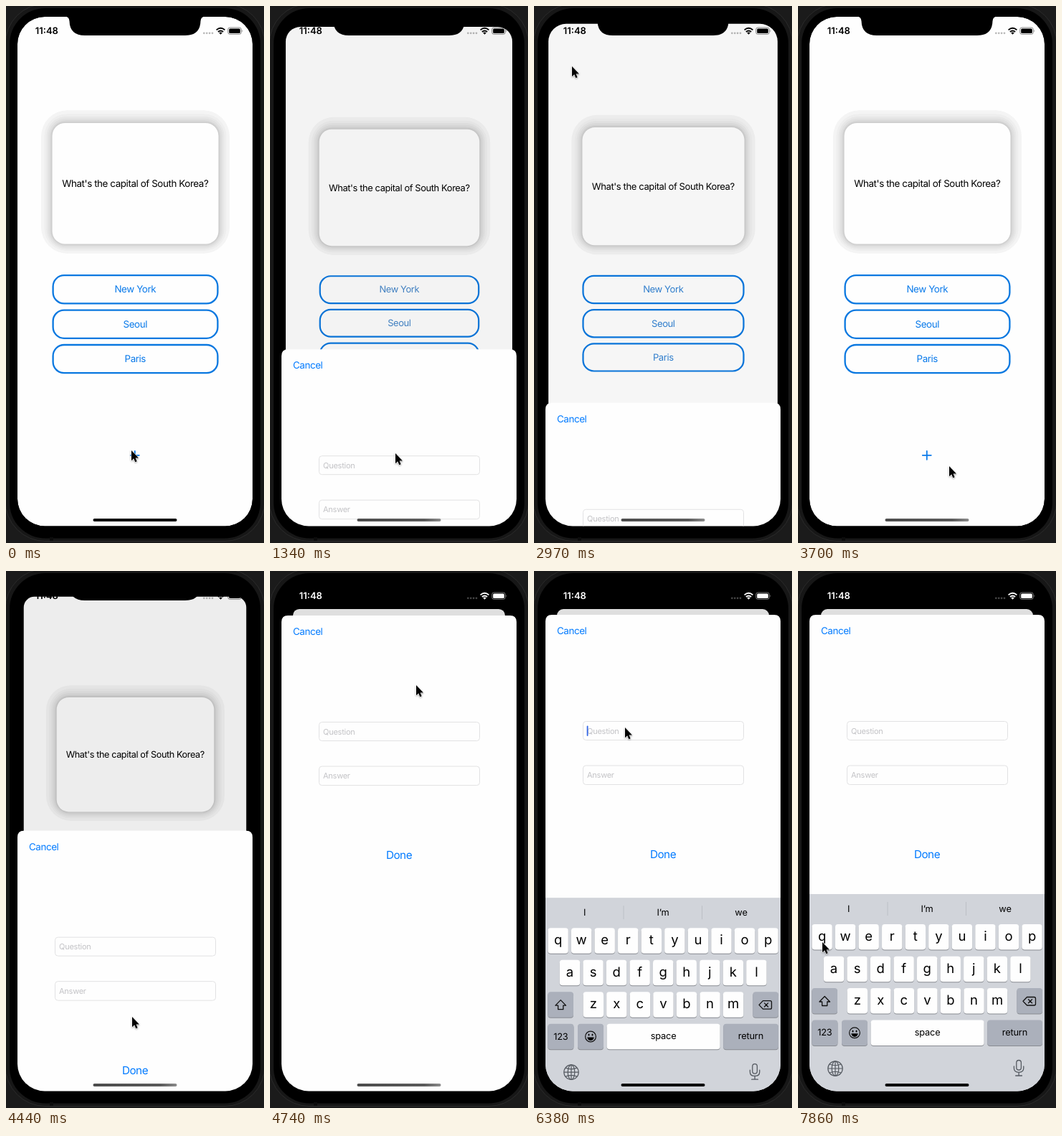
These frames come from a looping animation (360 by 748 pixels, 8000 ms). An HTML page:

```html
<!DOCTYPE html>
<html lang="en">
<head>
<meta charset="utf-8">
<title>Quiz app</title>
<style>
  html, body { margin: 0; width: 100%; height: 100%; overflow: hidden; background: #1b1b1b; }
  svg { display: block; width: 100%; height: 100%; }
  text { font-family: Inter, Roboto, sans-serif; text-rendering: geometricPrecision; }
  .mid { text-anchor: middle; }
  .body { font-size: 13.4px; letter-spacing: -.42px; }
  .hint { font-size: 11px; letter-spacing: -.25px; fill: #c3c3c6; }
  .done { font-size: 15.3px; letter-spacing: -.5px; }
  .key { font-size: 18.5px; }
  .word { font-size: 12.8px; letter-spacing: -.2px; }
  .line { fill: none; stroke-linecap: round; stroke-linejoin: round; }
</style>
</head>
<body>
<svg viewBox="0 0 360 748">
  <defs>
    <clipPath id="screen"><rect x="16" y="15" width="328" height="709.5" rx="38"/></clipPath>
    <linearGradient id="fade">
      <stop offset="0" stop-color="#4c4c4c"/>
      <stop offset=".8" stop-color="#5a5a5a"/>
      <stop offset="1" stop-color="#8c8c8c"/>
    </linearGradient>
    <filter id="soft" x="-50%" y="-50%" width="200%" height="200%">
      <feDropShadow dx="0" dy="1" stdDeviation=".9" flood-opacity=".4"/>
    </filter>
  </defs>

  <rect width="360" height="748" fill="#1b1b1b"/>
  <rect x="-1" y="-3" width="362" height="748.5" rx="56" fill="#171717" stroke="#2b2b2b"/>
  <rect x="5" y="3" width="350" height="738.5" rx="50"/>
  <rect x="61" y="740" width="5" height="5" fill="#0c0c0c"/>

  <g clip-path="url(#screen)">
    <g id="home">
      <rect id="page" x="16" y="15" width="328" height="709.5" fill="#fefefe"/>
      <g id="glow"></g>
      <rect x="64.5" y="163" width="232" height="168.5" rx="18" fill="#fefefe"/>
      <text class="body mid" x="180.3" y="252">What's the capital of South Korea?</text>
      <g id="choices"></g>
      <path id="plus" class="line" d="M173.8 625.8H185.8M179.8 619.8V631.8" stroke-width="1.8"/>
      <rect id="dim" x="16" y="15" width="328" height="709.5"/>
    </g>

    <g id="sheet">
      <path d="M16 720V9Q16 0 25 0H335Q344 0 344 9V720Z" fill="#fefefe"/>
      <text id="cancel" class="body" x="32" y="27" fill="#007aff">Cancel</text>
      <g fill="none" stroke="#e2e2e3">
        <rect x="68.5" y="148.5" width="224" height="26" rx="4"/>
        <rect x="68.5" y="210" width="224" height="26.5" rx="4"/>
      </g>
      <text class="hint" x="74" y="165.6">Question</text>
      <text class="hint" x="74" y="227.3">Answer</text>
      <text class="done mid" x="180" y="339" fill="#007aff">Done</text>
      <rect id="caret" x="73.7" y="154.5" width="1.8" height="14.5" rx=".9" fill="#3567e6"/>
    </g>

    <g id="board"></g>
  </g>

  <path d="M81 14Q88.500 15 88.500 21Q89 41 110 41H250Q271 41 271.500 21Q271.500 15 279 14Z"/>

  <g id="status" fill="currentColor">
    <text x="40.800" y="39" font-size="13" font-weight="600">11:48</text>
    <g id="dots"></g>
    <g class="line" stroke="currentColor" stroke-width="1.9" style="stroke-linecap:butt">
      <path d="M293.600 33.400Q299.500 28.100 305.400 33.400M295.900 36Q299.500 32.900 303.100 36"/>
    </g>
    <path d="M297.200 37.300Q299.500 35.600 301.800 37.300L299.500 39.700Z"/>
    <rect x="309.700" y="30" width="18.600" height="9.400" rx="2.800" fill="none" stroke="currentColor" stroke-opacity=".45"/>
    <rect x="311.200" y="31.500" width="15.600" height="6.400" rx="1.500"/>
    <path d="M329.500 33Q331.200 34.700 329.500 36.400Z" fill-opacity=".5"/>
  </g>

  <rect id="bar" x="121.500" y="714" width="117" height="4" rx="2"/>
  <path id="pointer" d="M0 0V14.200L3.200 11.300L5.300 16.200L7.700 15.200L5.600 10.400H10Z"
        stroke="#fff" stroke-width="1" paint-order="stroke" filter="url(#soft)"/>
</svg>

<script>
const LOOP = 8000, STEP = 148.2, LAST = 53;
const SHEET_IN = [1278, 4367], SHEET_OUT = 2850, KEYS_IN = 6118;
const PRESS_PLUS = [[1035, 1278], [4140, 4367]], PRESS_CANCEL = [2660, 2850];

// Pointer stops: time, x, y
const PATH = [
  [0, 175, 619], [148, 175, 623], [1630, 175, 623], [2520, 53, 84], [3000, 53, 84],
  [3705, 211, 641], [4150, 176, 621], [4446, 176, 621], [4742, 204, 159],
  [5335, 127, 218], [7120, 127, 218], [7565, 62, 573], [7855, 34, 517]
];

const $ = id => document.getElementById(id);
const set = (id, attrs) => {
  for (const k in attrs) $(id).setAttribute(k, attrs[k]);
};
const within = (t, [a, b]) => t >= a && t < b;
const mix = (a, b, p) => a + (b - a) * p;
const rect = (x, y, w, h, r, rest) =>
  `<rect x="${x}" y="${y}" width="${w}" height="${h}" rx="${r}" ${rest}/>`;
const label = (s, x, y, cls) => `<text class="${cls} mid" x="${x}" y="${y}">${s}</text>`;

function buildHome() {
  const bands = [[15.5, 244], [11, 238], [8, 231], [5.5, 224], [3, 214], [1.2, 203]];
  $('glow').innerHTML = bands.map(([o, c]) =>
    rect(64.5 - o, 163 - o * 1.14, 232 + 2 * o, 168.5 + 2 * o, 18 + o * 1.2, `fill="rgb(${c},${c},${c})"`)
  ).join('');
  $('choices').innerHTML = ['New York', 'Seoul', 'Paris'].map((s, i) =>
    rect(65.6, 375.2 + i * 48.4, 229.8, 39.2, 15.5, 'fill="none" stroke="#0a78e0" stroke-width="2.3"') +
    label(s, 180.3, 399.2 + i * 48.4, 'body')
  ).join('');
  $('dots').innerHTML = [0, 1, 2, 3].map(i =>
    `<circle cx="${276.3 + i * 3.9}" cy="37.800" r="1.350" fill-opacity=".28"/>`).join('');
}

function buildBoard() {
  const cap = (x, y, w, dark) =>
    rect(x, y + 1, w, 35.5, 4, 'fill="#888b91"') +
    rect(x, y, w, 35.5, 4, `fill="${dark ? '#abb0bb' : '#fefefe'}"`);
  const row = (letters, x0, y) => [...letters].map((c, i) => {
    const x = x0 + i * 32.55;
    return cap(x, y, 28.4) + label(c, x + 14.2, y + 23.3, 'key');
  }).join('');
  const icon = (d, w = 1.3, c = '#111') =>
    `<path class="line" d="${d}" stroke="${c}" stroke-width="${w}"/>`;
  const grey = '#555a61';

  $('board').innerHTML =
    rect(16, 450, 328, 290, 0, 'fill="#d1d4da"') +
    rect(124.5, 461, 1, 19, 0, 'fill="#bcc0c6"') + rect(234, 461, 1, 19, 0, 'fill="#bcc0c6"') +
    label('I', 70.5, 475.3, 'word') + label('I’m', 180, 475.3, 'word') + label('we', 289, 475.3, 'word') +
    row('qwertyuiop', 19.4, 492) + row('asdfghjkl', 35.8, 536.7) + row('zxcvbnm', 68.6, 581) +
    cap(19.4, 581, 35.6, true) + cap(305.4, 581, 35.6, true) +
    cap(19.4, 625.5, 36, true) + cap(61, 625.5, 36, true) +
    cap(101.6, 625.5, 158, false) + cap(264.2, 625.5, 76.8, true) +
    label('123', 37.4, 647.4, 'word') + label('space', 180.6, 647.2, 'word') + label('return', 302.4, 647.2, 'word') +
    icon('M37.200 592.500L44.500 600H40.800V605.500H33.600V600H29.900Z') +
    icon('M319.500 593.500H329.500Q331.500 593.500 331.500 595.500V603Q331.500 605 329.500 605H319.500L314 599.250Z' +
         'M321.500 596.700L326.600 601.800M326.600 596.700L321.500 601.800') +
    '<circle cx="79" cy="643.300" r="7.400" fill="none" stroke="#111" stroke-width="1.200"/>' +
    '<ellipse cx="76.500" cy="640.900" rx="1" ry="1.500"/><ellipse cx="81.500" cy="640.900" rx="1" ry="1.500"/>' +
    '<path d="M74.200 644.300H83.800Q82.600 648.900 79 648.900Q75.400 648.900 74.200 644.300Z"/>' +
    `<g fill="none" stroke="${grey}" stroke-width="1.200"><circle cx="52" cy="693" r="10.200"/>` +
    '<ellipse cx="52" cy="693" rx="4.800" ry="10.200"/>' +
    '<path d="M52 682.800V703.200M41.800 693H62.200M44.200 687Q52 690.500 59.800 687M44.200 699Q52 695.500 59.800 699"/></g>' +
    rect(304.8, 681.5, 6.6, 13.5, 3.3, `fill="none" stroke="${grey}" stroke-width="1.300"`) +
    icon('M301.400 690V692.500Q301.400 698.300 308.100 698.300Q314.800 698.300 314.800 692.500V690M308.100 698.300V703M303.700 703H312.500', 1.3, grey);
}

// Critically damped spring from 0 to 1
function spring(ms) {
  if (ms <= 0) return 0;
  const x = ms * 0.0232;
  return 1 - (1 + x) * Math.exp(-x);
}

function sheetAt(t) {
  if (t >= SHEET_IN[1]) return spring(t - SHEET_IN[1]);
  if (t >= SHEET_OUT) {
    const p = 1 - spring(t - SHEET_OUT);
    return p < 0.004 ? 0 : p;
  }
  return spring(t - SHEET_IN[0]);
}

function pointerAt(t) {
  const i = PATH.findIndex(s => s[0] > t);
  if (i < 0) return PATH[PATH.length - 1].slice(1);
  const [t0, x0, y0] = PATH[i - 1], [t1, x1, y1] = PATH[i];
  const u = (t - t0) / (t1 - t0), e = u * u * (3 - 2 * u);
  return [mix(x0, x1, e), mix(y0, y1, e)];
}

function draw(t) {
  const p = sheetAt(t), s = 1 - 0.0976 * p;
  const r = 10 + 28 * (1 - p) ** 2;
  set('home', { transform: `translate(${180 * (1 - s)} ${15 + 38 * p - 15 * s}) scale(${s})` });
  set('page', { rx: r });
  set('dim', { rx: r, opacity: 0.12 * p });

  const g = Math.min(1, p * 1.1);
  const tint = `rgb(${mix(10, 150, g)},${mix(122, 150, g)},${mix(234, 154, g)})`;
  set('choices', { fill: tint });
  set('plus', { stroke: tint, opacity: PRESS_PLUS.some(w => within(t, w)) ? 0.25 : 1 });

  set('sheet', { transform: `translate(0 ${724.5 - 663.5 * p})`, visibility: p > 0 ? 'visible' : 'hidden' });
  set('cancel', { opacity: within(t, PRESS_CANCEL) ? 0.22 : 1 });
  set('caret', { opacity: t >= 6070 && (t - 6070) % 1000 < 540 ? 1 : 0 });

  const k = spring(t - KEYS_IN);
  set('board', { transform: `translate(0 ${(1 - k) * 275})`, visibility: k > 0 ? 'visible' : 'hidden' });

  set('status', { color: p > 0.6 ? '#fff' : '#000' });
  set('bar', { fill: t < SHEET_IN[0] || t >= KEYS_IN ? '#000' : 'url(#fade)' });
  set('pointer', { transform: `translate(${pointerAt(t).join(' ')})` });
}

let start = null;
function tick(now) {
  if (start === null) start = now;
  const n = Math.floor(((now - start) % LOOP + 8) / STEP);
  draw(Math.min(n, LAST) * STEP);
  requestAnimationFrame(tick);
}

buildHome();
buildBoard();
draw(0);
requestAnimationFrame(tick);
</script>
</body>
</html>
```
